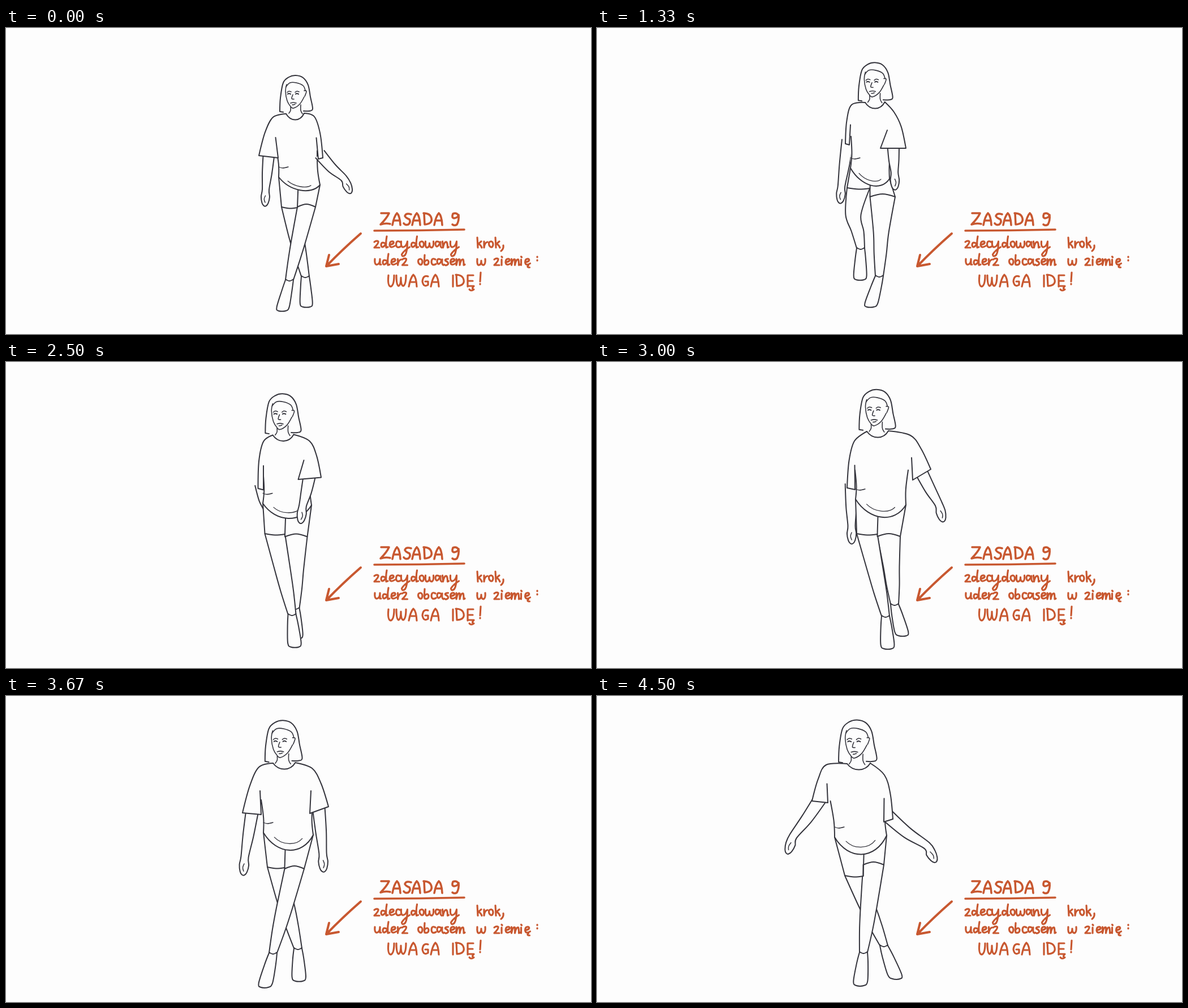
These frames come from a looping animation (1034x542 px, 4670 ms). An HTML page with a canvas:

```html
<!DOCTYPE html>
<html lang="pl">
<head>
<meta charset="utf-8">
<title>Zasada 9</title>
<style>
html, body { margin: 0; width: 100%; height: 100%; overflow: hidden; background: #fdfdfd; }
canvas { display: block; }
</style>
</head>
<body>
<canvas id="stage" width="1034" height="542" role="img" aria-label="ZASADA 9: zdecydowany krok, uderz obcasem w ziemię: UWAGA IDĘ!"></canvas>
<script>
const ctx = document.getElementById('stage').getContext('2d');
const PAPER = '#fdfdfd', PENCIL = '#34343c', INK = '#c85830';
const LOOP = 4670, COUNT = 28;

const points = s => s.split(' ').map(p => p.split(',').map(Number));
const add = (p, dx, dy) => [p[0] + dx, p[1] + dy];
const mix = (a, b, k = 0.5) => [a[0] + (b[0] - a[0]) * k, a[1] + (b[1] - a[1]) * k];
const unit = (a, b) => {
  const d = Math.hypot(b[0] - a[0], b[1] - a[1]) || 1;
  return [(b[0] - a[0]) / d, (b[1] - a[1]) / d];
};

// Where the main joints pass at the key moments of the walk.
const KEYS = [0, 4, 8, 12, 18, 22, 27];
const CHIN = points('508,142 496,136 487,122 479,126 490,113 485,109 455,110');
const LEFT = {
  dir: -1,
  shoulder: points('472,158 455,146 450,136 455,142 455,140 447,126 405,122'),
  sleeve: points('447,226 426,213 439,205 449,225 442,223 418,207 380,186'),
  cuff: points('481,230 449,221 446,207 454,227 456,226 451,210 408,189'),
  wrist: points('459,286 412,278 432,280 475,235 450,290 422,285 347,248'),
  hip: points('482,264 460,257 448,248 451,258 457,243 455,242 420,250'),
  thigh: points('487,317 470,317 442,283 456,304 459,304 462,303 438,318'),
  ankle: points('529,440 516,433 466,390 501,444 510,450 516,447 507,442'),
  toe: points('531,494 529,490 465,446 507,502 514,508 518,505 529,501')
};
const RIGHT = {
  dir: 1,
  shoulder: points('545,157 535,157 525,149 519,150 554,130 541,128 508,140'),
  sleeve: points('560,230 553,225 546,213 524,219 590,190 570,196 523,218'),
  cuff: points('552,232 538,227 501,213 475,207 558,209 537,208 507,223'),
  wrist: points('597,266 611,239 526,256 445,257 604,252 560,279 583,265'),
  hip: points('555,278 541,257 517,267 534,254 546,253 543,246 512,247'),
  thigh: points('547,317 536,304 527,299 529,310 536,309 527,306 507,299'),
  ankle: points('501,446 497,443 499,439 497,443 526,429 472,455 471,454'),
  toe: points('488,501 486,497 483,494 486,495 540,485 457,516 465,513')
};

function at(path, frame) {
  let i = 0;
  while (i < KEYS.length - 2 && KEYS[i + 1] <= frame) i++;
  return mix(path[i], path[i + 1], (frame - KEYS[i]) / (KEYS[i + 1] - KEYS[i]));
}

function side(tracks, frame) {
  const s = { dir: tracks.dir };
  for (const k in tracks) if (k !== 'dir') s[k] = at(tracks[k], frame);
  return s;
}

// Smooth curve through the points; listed corners stay sharp.
function curve(p, corners = []) {
  const last = p.length - 1, path = new Path2D();
  const tangent = i => corners.includes(i) || i === 0 || i === last
    ? [0, 0] : [(p[i + 1][0] - p[i - 1][0]) / 6, (p[i + 1][1] - p[i - 1][1]) / 6];
  path.moveTo(...p[0]);
  for (let i = 0; i < last; i++) {
    const s = tangent(i), e = tangent(i + 1);
    path.bezierCurveTo(...add(p[i], ...s), ...add(p[i + 1], -e[0], -e[1]), ...p[i + 1]);
  }
  return path;
}

function stroke(path, width = 2) {
  ctx.lineWidth = width;
  ctx.stroke(path);
}

function shape(p, corners) {
  const path = curve(p, corners);
  ctx.fill(path);
  stroke(path);
}

// Outline around a spine: down one edge and back up the other.
function limb(spine, widths, upright, corners = []) {
  const last = spine.length - 1;
  const edge = sign => spine.map((p, i) => {
    const [ux, uy] = upright ? [0, 1] : unit(spine[Math.max(0, i - 1)], spine[Math.min(last, i + 1)]);
    const w = sign * widths[i] / 2;
    return add(p, uy * w, -ux * w);
  });
  const a = edge(-1), b = edge(1);
  shape([...a, ...b.reverse()], [...corners, ...corners.map(c => 2 * last + 1 - c)]);
  return a;
}

function arm(s, size) {
  const top = mix(s.sleeve, s.cuff), { wrist } = s;
  const start = mix(top, s.shoulder, 0.1);
  const [ux, uy] = unit(top, wrist);
  const [hx, hy] = unit([0, 0], [ux, uy + 1]);
  const hand = k => add(wrist, hx * k * size, hy * k * size);
  limb([start, mix(top, wrist), wrist, hand(13), hand(24), hand(29)],
    [20, 17, 12, 15, 11, 4].map(w => w * size));
  stroke(curve([hand(11), add(hand(17), 2 * s.dir, 0), hand(23)]), 1.5);
}

function leg(s, crotch, size) {
  const { thigh, ankle, toe } = s;
  const top = [(thigh[0] + crotch) / 2, thigh[1]];
  const bend = s.dir * Math.max(0, 118 - ankle[1] + top[1]);
  const spine = [
    top, add(mix(top, ankle, 0.45), bend, 0), add(mix(top, ankle, 0.72), bend * 0.4, 0), ankle,
    mix(ankle, toe, 0.35), mix(ankle, toe, 0.88), toe
  ];
  const widths = [Math.abs(thigh[0] - crotch), 26 * size, 21 * size, 14, 18 * size, 22 * size, 13];
  limb(spine, widths, true, [3]);
  stroke(curve([add(ankle, -7, -1), add(ankle, 0, 2), add(ankle, 7, -1)]));
}

function shorts(l, r, crotch) {
  const cl = [crotch, l.thigh[1] + 1], cr = [crotch, r.thigh[1]];
  shape([l.hip, l.thigh, add(mix(l.thigh, cl), 0, 2), cl, cr, add(mix(cr, r.thigh), 0, -5), r.thigh, r.hip], [1, 3, 4, 6]);
  stroke(curve([[crotch + 2, l.hip[1]], cl]));
}

function hem(path, a, b, sag) {
  path.bezierCurveTo(...add(mix(a, b, 0.27), 0, sag * 4 / 3), ...add(mix(a, b, 0.78), 0, sag * 4 / 3), ...b);
  return path;
}

function arc(a, b, sag) {
  const path = new Path2D();
  path.moveTo(...a);
  return hem(path, a, b, sag);
}

function torso(l, r, neckL, neckR, sag) {
  const body = arc(l.hip, r.hip, sag);
  for (const p of [r.shoulder, neckR, neckL, l.shoulder]) body.lineTo(...p);
  ctx.fill(body);
  stroke(arc(l.hip, r.hip, sag));
  for (const s of [l, r]) {
    const waist = add(mix(s.shoulder, s.hip, 0.78), -2 * s.dir, 0);
    stroke(curve([mix(s.shoulder, s.hip, 0.5), waist, s.hip]));
  }
  const foldL = add(mix(l.hip, r.hip, 0.22), 0, sag * 0.25), foldR = add(mix(l.hip, r.hip, 0.78), 0, sag * 0.25);
  stroke(arc(foldL, foldR, sag * 0.35), 1.3);
  const crease = add(l.hip, 0, -18);
  stroke(curve([crease, add(crease, 7, 2), add(crease, 17, 0)]), 1.3);
}

function sleeve(s, neck) {
  const [ux, uy] = unit(s.shoulder, s.sleeve);
  const bulge = add(mix(s.shoulder, s.sleeve, 0.42), uy * 4 * s.dir, -ux * 4 * s.dir);
  shape([neck, s.shoulder, bulge, s.sleeve, s.cuff, mix(s.shoulder, s.cuff)], [3, 4]);
}

// Head drawn around the chin.
const HAIR = points('-18,7 -24,6 -23,-18 -18,-45 -8,-55 4,-58 17,-54 26,-41 30,-20 34,1 28,5 18,5');
const FACE = [
  '-12,-42 -14,-30 -11,-13 -5,-3 0,0 11,-7 19,-20', '-13,-38 -6,-45 5,-45 17,-40 21,-31',
  '19,-31 23,-30 20,-21', '-5,-2 -5,4 -8,9', '13,-6 13,4 16,10',
  '-1,-24 -3,-17 1,-16', '-5,-9 0,-10 5,-9', '-2,-6 0,-6 3,-7'
].map(points);

function head(chin, size) {
  const place = p => p.map(([x, y]) => add(chin, x * size, y * size));
  shape(place(HAIR), [1]);
  for (const f of FACE) stroke(curve(place(f)), 1.6);
  for (const x of [-8, 6]) {
    stroke(curve(place([[x - 3, -28], [x, -30], [x + 4, -29]])), 1.6);
    stroke(curve(place([[x - 2, -25], [x, -26], [x + 3, -25]])), 2);
  }
}

function walker(frame) {
  const near = frame / (COUNT - 1), size = 1 + 0.13 * near;
  const chin = at(CHIN, frame), l = side(LEFT, frame), r = side(RIGHT, frame);
  const neckL = add(chin, -13, 10), neckR = add(chin, 19 + 9 * near, 9);
  const crotch = (l.thigh[0] + r.thigh[0]) / 2 - 2;

  ctx.strokeStyle = PENCIL;
  ctx.fillStyle = PAPER;
  arm(l, size);
  const legs = [l, r].sort((a, b) => a.toe[1] - b.toe[1]);
  for (const s of legs) leg(s, crotch, size);
  shorts(l, r, crotch);
  torso(l, r, neckL, neckR, 16 + 16 * near);
  arm(r, size);
  sleeve(l, neckL);
  sleeve(r, neckR);
  head(chin, size * (1 + 0.03 * near));
  stroke(arc(neckL, neckR, 11));
}

// Pen strokes of the lettering: advance and outline from the baseline.
const GLYPHS = {
  z: [12, 'M1-10q4-3 7-1q1 3-7 11h9'],
  d: [14, 'M9-7q-8-5-8 3q2 7 9-3M11-20q-2 11-1 20l3-1'],
  e: [11.5, 'M2-5q10-2 6-6q-6-1-6 6q1 7 9 2'],
  c: [10, 'M9-10q-7-4-7 5q1 7 8 3'],
  y: [18, 'M1-11q-1 11 4 10q5-1 7-10q0 18-4 24q-5 5-6-1q4-7 14-13'],
  o: [11, 'M6-11q-6 0-4 7q5 7 7-1q0-6-4-6'],
  w: [16.5, 'M1-11q-1 11 3 11q4-1 4-8q0 8 4 8q4-2 3-11'],
  a: [13.5, 'M10-9q-8-5-8 3q2 9 8-2l1-2q-1 9 2 10'],
  n: [14, 'M1-11l1 11q2-11 6-10q2 2 2 10l2-1'],
  k: [12, 'M2-18l1 18M9-11l-6 5q4-1 7 6'],
  r: [9, 'M2-11v11q1-9 6-10'],
  u: [14, 'M1-11q-1 11 4 10q5-1 5-10v10h2'],
  b: [12, 'M2-18q-1 14 0 17q7 2 7-5q-2-6-7 0'],
  s: [10, 'M8-11q-6 0-5 3q6 3 5 6q-3 4-7 1'],
  m: [16, 'M1-11v11q2-12 6-10v10q2-11 6-10q1 2 1 10l2-1'],
  i: [7, 'M2-10v10M2-15l1 1'],
  ę: [14, 'M2-5q10-2 6-6q-6-1-6 6q1 7 9 2M8 0q-4 4 2 4'],
  ',': [5, 'M4-4q1 6-4 10'],
  ':': [4, 'M2-15v1M2-9v1'],
  Z: [22, 'M3-21h14q-4 9-15 20q9-3 17-1'],
  A: [20, 'M1 0q3-16 8-21q5 4 6 21M4-8h10'],
  S: [15, 'M14-19q-9-3-11 3q1 3 8 6q3 5-2 9q-5 2-8-2'],
  D: [19, 'M2-21l1 20q14-1 12-11q-2-9-14-9'],
  G: [16, 'M12-18q-9-3-10 9q2 11 10 6v-6h-5'],
  U: [14, 'M1-20q-2 19 4 20q6-2 6-20'],
  W: [22, 'M1-20q0 18 4 19q4-2 4-15q0 14 4 15q5-2 5-19'],
  I: [6, 'M2-20v20'],
  Ę: [16, 'M3-20v20M3-20h10M3-10h9M3-1h11q-5 5 0 6q-5 4-8 0'],
  9: [16, 'M14-16q-3-7-10-4q-3 7 2 8q7-1 8-6q1 10-3 17q-4 3-8 0'],
  '!': [4, 'M2-24l-1 16M1-4v1']
};

function word(text, x, y) {
  const path = new Path2D();
  for (const ch of text) {
    const [advance, d] = GLYPHS[ch];
    path.addPath(new Path2D(d), { e: x, f: y });
    x += advance;
  }
  return path;
}

const title = [word('ZASADA', 660, 349), word('9', 786, 349), new Path2D('M651 359Q730 359 810 357')];
const note = [
  word('zdecydowany', 650, 389), word('krok,', 831, 389),
  word('uderz', 651, 420), word('obcasem', 727, 420), word('w', 832, 420), word('ziemię', 862, 420), word(':', 937, 420),
  word('UWA', 675, 458), word('GA', 734, 458), word('IDĘ', 788, 458), word('!', 837, 457)
];
const arrow = new Path2D('M627 364Q595 392 567 421M571 402L566 422L588 418');

function lettering() {
  ctx.strokeStyle = INK;
  for (const path of title) stroke(path, 3.6);
  for (const path of note) stroke(path, 3.2);
  stroke(arrow, 4);
}

// Six drawings a second, each start rounded to 10 ms.
function frameAt(t) {
  let i = COUNT - 1;
  while (Math.round(i * 100 / 6) * 10 > t) i--;
  return i;
}

const start = performance.now();
function draw() {
  ctx.fillStyle = PAPER;
  ctx.fillRect(0, 0, 1034, 542);
  ctx.lineCap = ctx.lineJoin = 'round';
  walker(frameAt(Math.max(0, performance.now() - start) % LOOP));
  lettering();
  requestAnimationFrame(draw);
}
draw();
</script>
</body>
</html>
```
